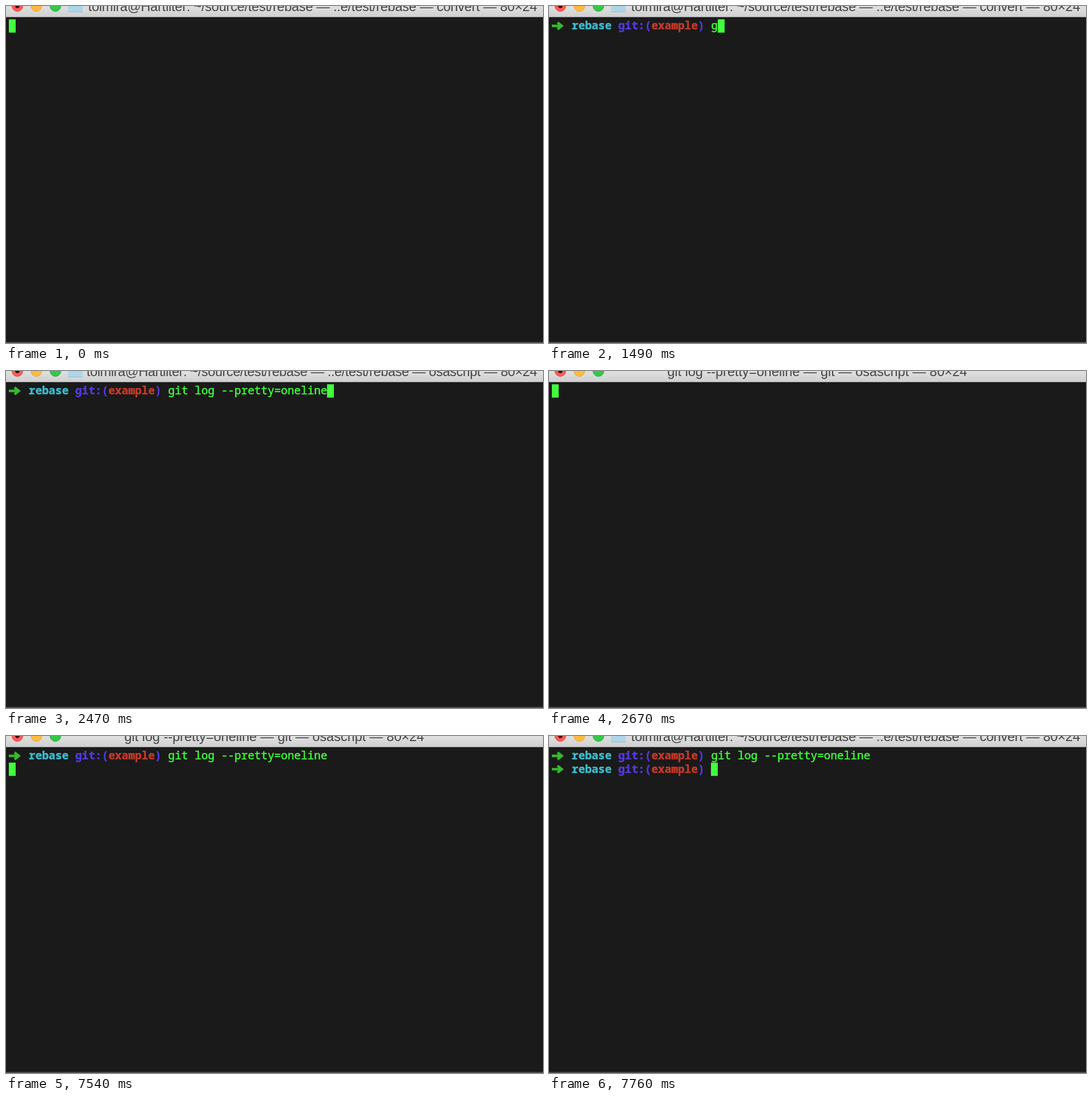
Animation of 945 by 593 pixels, one loop 8000 ms. Source, as an HTML page with a canvas:

```html
<!DOCTYPE html>
<html lang="en">
<head>
<meta charset="utf-8">
<title>Terminal: git log</title>
<style>
  html, body { margin: 0; width: 100%; height: 100%; overflow: hidden; background: #1a1a1a; }
  canvas { display: block; }
</style>
</head>
<body>
<canvas id="stage" width="945" height="593"></canvas>
<script>
const ctx = document.getElementById('stage').getContext('2d');
const LOOP = 8000, LEFT = 5, CELL = 11.68, ROW = 23.4;
const MONO = '19.47px "Noto Sans Mono", "DejaVu Sans Mono", monospace';
const GREEN = '#3dff3a', CURSOR = '#42ff3d', HASH = '#b8ac35';
const COMMAND = 'git log --pretty=oneline';
const LOG = [
  ['886fd13d19f203500193e990989cc10c2629b21b', 'feature-1: update for review comments'],
  ['d039aa09fe84d245d1718bf9290db1356da47a9a', 'feature-1: finished!'],
  ['72cb82cbdd6c91411cb261b62ea9404b78a08c4f', 'feature-1: started feature!'],
  ['830e4692c2863f5db0fdcd0960ebdf82e3ce54e8', 'initial commit']
];

const colX = col => LEFT + col * CELL;
const rowY = row => (row + 1) * ROW;

// The thin outline gives the slightly heavy look of smoothed terminal text.
function write(text, col, row, color = GREEN, weight = 'normal') {
  const x = colX(col), y = rowY(row) + 18;
  ctx.font = `${weight} ${MONO}`;
  ctx.fillStyle = ctx.strokeStyle = color;
  ctx.lineWidth = 0.5;
  ctx.fillText(text, x, y);
  ctx.strokeText(text, x, y);
}

function block(col, row, cells = 1) {
  ctx.fillStyle = CURSOR;
  ctx.fillRect(Math.floor(colX(col)), rowY(row), Math.round(cells * CELL), ROW);
}

function disc(x, y, radius, fill, edge) {
  ctx.beginPath();
  ctx.arc(x, y, radius, 0, Math.PI * 2);
  ctx.fillStyle = fill;
  ctx.fill();
  if (edge) {
    ctx.strokeStyle = edge;
    ctx.lineWidth = 1;
    ctx.stroke();
  }
}

function arrow(row) {
  const y = rowY(row) + 11.6;
  ctx.strokeStyle = '#35ba2d';
  ctx.lineWidth = 4.4;
  ctx.beginPath();
  ctx.moveTo(5, y);
  ctx.lineTo(22, y);
  ctx.moveTo(15, y - 6);
  ctx.lineTo(22.5, y);
  ctx.lineTo(15, y + 6);
  ctx.stroke();
}

function prompt(row, typed = '') {
  arrow(row);
  write('rebase', 3, row, '#3dbbcb', 'bold');
  write('git:(', 10, row, '#5239dc', 'bold');
  write('example', 15, row, '#c5392a', 'bold');
  write(')', 22, row, '#5239dc', 'bold');
  write(typed, 24, row);
}

function titleBar(place, process) {
  const shade = ctx.createLinearGradient(0, 0, 0, 19);
  shade.addColorStop(0, '#e0e0e0');
  shade.addColorStop(1, '#d0d0d0');
  ctx.fillStyle = shade;
  ctx.fillRect(0, 0, 945, 19);
  ctx.fillStyle = '#777';
  ctx.fillRect(0, 19, 945, 1);

  disc(20, 0, 9.5, '#fc5b57', '#e2443f');
  disc(20, 0, 3.8, '#3a0805');
  disc(53.5, 0, 9.5, '#fdbc40', '#e2a336');
  disc(87, 0, 9.5, '#34c84a', '#27aa35');

  ctx.font = '23.5px "Liberation Sans", Arial, sans-serif';
  const tail = ` — ${process} — 80×24`;
  if (place === 'home') {
    ctx.fillStyle = '#add6ea';
    ctx.fillRect(109, 0, 26, 10);
    ctx.fillStyle = '#94bfd3';
    ctx.fillRect(109, 10, 26, 1);
    ctx.letterSpacing = process === 'convert' ? '-0.2px' : '-0.38px';
    ctx.textAlign = 'right';
    ctx.fillStyle = '#454545';
    ctx.fillText('tolmira@Hartliter: ~/source/test/rebase — ..e/test/rebase' + tail, 934.5, 8.5);
  } else {
    ctx.textAlign = 'center';
    ctx.fillStyle = '#454545';
    ctx.fillText(COMMAND + ' — git' + tail, 472, 8.5);
  }
  ctx.textAlign = 'left';
  ctx.letterSpacing = '0px';
}

const screens = {
  blank() { block(0, 0); },
  ready() { prompt(0); block(24, 0); },
  firstKey() { prompt(0, 'g'); block(25, 0); },
  typed() { prompt(0, COMMAND); block(24 + COMMAND.length, 0); },
  entered() { prompt(0, COMMAND); block(0, 1); },
  log() {
    LOG.forEach(([hash, message], row) => {
      write(hash, 0, row, HASH);
      write(message, 41, row);
    });
    block(0, 4, 7);
    write('(END)', 0, 4, '#111');
  },
  returned() { prompt(0, COMMAND); prompt(1); block(24, 1); }
};

// Start time, screen, title, process shown in the title
const timeline = [
  [0, 'blank', 'home', 'convert'],
  [20, 'ready', 'home', 'osascript'],
  [1490, 'firstKey', 'home', 'convert'],
  [1590, 'typed', 'home', 'convert'],
  [2470, 'typed', 'home', 'osascript'],
  [2570, 'entered', 'git', 'convert'],
  [2670, 'blank', 'git', 'osascript'],
  [2770, 'log', 'git', 'convert'],
  [7540, 'entered', 'git', 'osascript'],
  [7640, 'entered', 'git', 'convert'],
  [7740, 'entered', 'home', 'osascript'],
  [7760, 'returned', 'home', 'convert']
];

function draw() {
  const time = performance.now() % LOOP;
  const [, screen, place, process] = timeline.filter(step => step[0] <= time).pop();
  ctx.fillStyle = '#1a1a1a';
  ctx.fillRect(0, 0, 945, 593);
  ctx.fillStyle = '#4a4a4a';
  ctx.fillRect(0, 591, 945, 2);
  titleBar(place, process);
  screens[screen]();
  requestAnimationFrame(draw);
}
draw();
</script>
</body>
</html>
```
